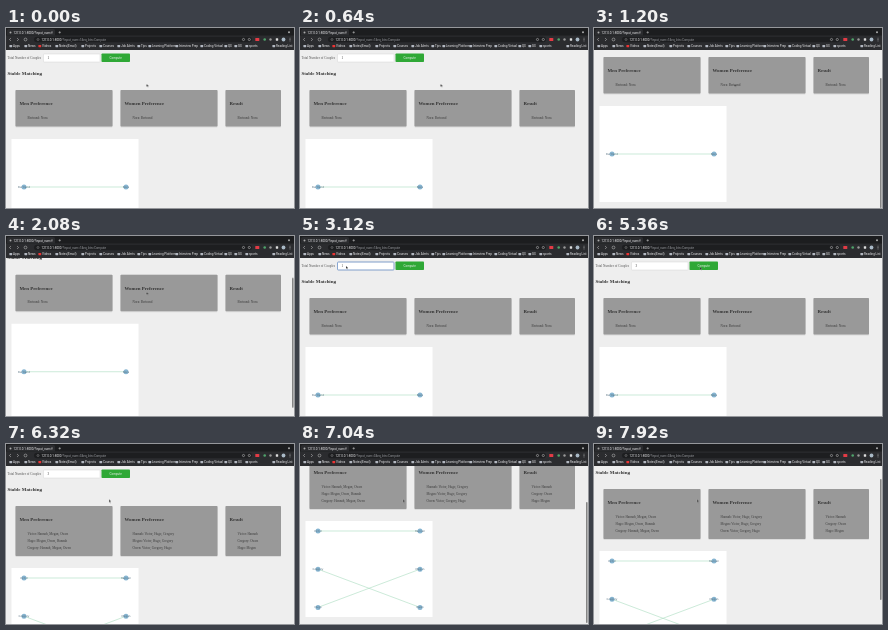
An HTML page for the animation above (8 s loop, 288 by 180 pixels).

```html
<!DOCTYPE html>
<html lang="en">
<head>
<meta charset="utf-8">
<title>Stable Matching</title>
<style>
html, body { margin: 0; width: 100%; height: 100%; overflow: hidden; background: #eee; }
svg { display: block; width: 100vw; height: 100vh; }
text { font-family: "Liberation Serif", serif; font-size: 3.3px; fill: #3c3c3c; }
.ui text, .small { font-family: Roboto, sans-serif; font-size: 3px; fill: #f0f0f2; }
.ui .dim { fill: #9a9ca0; }
.head { font-size: 4.9px; font-weight: bold; fill: #333; }
.mid { text-anchor: middle; }
.node { fill: #86b4d0; }
.edge { stroke: #a9dcc0; stroke-width: .6; }
.label { font-family: "DejaVu Sans", sans-serif; font-size: 2.7px; text-anchor: middle; fill: #56707f; }

.page, .thumb, .cursor, .before, .after, .focus, .menu, .one, .three, .bar {
  animation: 8s linear infinite;
}
.page { animation-name: scroll; animation-timing-function: ease-in-out; }
.thumb { animation-name: thumb; animation-timing-function: ease-in-out; }
.cursor { animation-name: pointer; animation-timing-function: ease-in-out; }
.before, .after, .focus, .menu, .one, .three, .bar { animation-timing-function: step-end; }
.before { animation-name: before; }
.after { animation-name: after; }
.focus { animation-name: focus; }
.menu { animation-name: menu; }
.one { animation-name: one; }
.three { animation-name: three; }
.bar { animation-name: bar; }

@keyframes scroll {
  0%, 12% { transform: translateY(0); }
  15%, 23% { transform: translateY(-33px); }
  31%, 79.5% { transform: translateY(0); }
  86%, 93% { transform: translateY(-47px); }
  98.5%, 100% { transform: translateY(-17px); }
}
@keyframes thumb {
  0%, 12% { transform: translateY(0); height: 130px; }
  15%, 23% { transform: translateY(28px); height: 130px; }
  31% { transform: translateY(0); height: 130px; }
  79.5% { transform: translateY(0); height: 121px; }
  86%, 93% { transform: translateY(36px); height: 121px; }
  98.5%, 100% { transform: translateY(13px); height: 121px; }
}
@keyframes pointer {
  0%, 31% { transform: translate(140.5px, 56px); }
  37%, 46% { transform: translate(46px, 30px); }
  53%, 59% { transform: translate(45px, 39px); }
  65%, 69% { transform: translate(106px, 31px); }
  76%, 100% { transform: translate(103px, 55.5px); }
}
@keyframes before { 0% { visibility: visible; } 68%, 100% { visibility: hidden; } }
@keyframes after { 0% { visibility: hidden; } 68%, 100% { visibility: visible; } }
@keyframes focus { 0% { visibility: hidden; } 38% { visibility: visible; } 67%, 100% { visibility: hidden; } }
@keyframes menu { 0% { visibility: hidden; } 47% { visibility: visible; } 59%, 100% { visibility: hidden; } }
@keyframes one { 0% { visibility: visible; } 59%, 100% { visibility: hidden; } }
@keyframes three { 0% { visibility: hidden; } 59%, 100% { visibility: visible; } }
@keyframes bar { 0% { visibility: hidden; } 12% { visibility: visible; } 33% { visibility: hidden; } 80%, 100% { visibility: visible; } }
</style>
</head>
<body>
<svg viewBox="0 0 288 180" preserveAspectRatio="none">
  <defs>
    <filter id="shadow" x="-10%" y="-10%" width="120%" height="130%">
      <feDropShadow dx="0" dy=".4" stdDeviation=".5" flood-opacity=".2"/>
    </filter>
  </defs>
  <rect width="288" height="180" fill="#eee"/>

  <g class="page">
    <text x="1.5" y="31" style="fill:#555">Total Number of Couples</text>
    <rect x="37.5" y="26" width="56.5" height="8" rx=".6" fill="#fff" stroke="#ccc" stroke-width=".4"/>
    <rect class="focus" x="37.5" y="26" width="56.5" height="8" rx=".8" fill="none" stroke="#7d9fd0" stroke-width=".9"/>
    <text class="one" x="41.5" y="31.2">1</text>
    <text class="three" x="41.5" y="31.2">3</text>
    <rect x="95.5" y="25.5" width="28.5" height="8.5" rx=".8" fill="#2fa836"/>
    <text class="small mid" x="109.7" y="30.9">Compute</text>
    <text class="head" x="1.5" y="46.5">Stable Matching</text>
    <g id="before" class="before"></g>
    <g id="after" class="after"></g>
    <g class="menu">
      <rect x="37.5" y="34" width="57" height="18.5" rx="1" fill="#1b1c1e"/>
      <text class="small" x="40" y="41">3</text>
      <text class="small" x="40" y="48">10</text>
    </g>
  </g>

  <g class="bar"><rect class="thumb" x="286" y="22" width="1.6" height="121" rx=".8" fill="#858585"/></g>

  <g id="chrome" class="ui">
    <rect width="288" height="22" fill="#2b2c2f"/>
    <rect width="288" height="7.5" fill="#1c1d1f"/>
    <path d="M1 7.5V2.5q0-1.5 1.5-1.5H47.5q1.5 0 1.5 1.5V7.5z" fill="#2b2c2f"/>
    <circle cx="4.5" cy="4.4" r="1" fill="#aaa"/>
    <text x="7.5" y="5.5">127.0.0.1:8000/?input_num=</text>
    <path d="M45.2 3.6l1.6 1.6m0-1.6l-1.6 1.6M52.5 4.4h2.4m-1.2-1.2v2.4M5 10l-1.6 1.5L5 13M11 10l1.6 1.5L11 13" fill="none" stroke="#ccc" stroke-width=".5"/>
    <circle cx="19.5" cy="11.5" r="1.4" fill="none" stroke="#ccc" stroke-width=".5"/>
    <circle cx="283" cy="4.2" r="1" fill="#aaa"/>
    <rect x="28" y="8.7" width="218" height="5.6" rx="2.8" fill="#1d1e20"/>
    <circle cx="32" cy="11.5" r="1" fill="none" stroke="#aaa" stroke-width=".4"/>
    <text class="before dim" x="35.5" y="12.6"><tspan fill="#f0f0f2">127.0.0.1:8000</tspan>/?input_num=1&amp;eq_btn=Compute</text>
    <text class="after dim" x="35.5" y="12.6"><tspan fill="#f0f0f2">127.0.0.1:8000</tspan>/?input_num=3&amp;eq_btn=Compute</text>
    <circle cx="237.5" cy="11.5" r="1.1" fill="none" stroke="#ccc" stroke-width=".5"/>
    <circle cx="243.3" cy="11.5" r="1.1" fill="none" stroke="#ccc" stroke-width=".5"/>
    <rect x="249.3" y="10" width="4" height="3" rx=".6" fill="#e23b45"/>
    <circle cx="258.7" cy="11.5" r="1.3" fill="#4fa36a"/>
    <circle cx="264.5" cy="11.5" r="1.2" fill="#999"/>
    <rect x="269.8" y="10.3" width="2.4" height="2.4" rx=".4" fill="#ddd"/>
    <circle cx="277.5" cy="11.5" r="1.9" fill="#a9b9c6"/>
    <path d="M284 9.8v3.6" stroke="#ddd" stroke-width=".7" stroke-dasharray=".7"/>
  </g>

  <path class="cursor" d="M0 0v2.8l.7-.6.5 1 .5-.2-.5-1.1h.9z" fill="#222" stroke="#ddd" stroke-width=".2"/>
</svg>
<script>
const NS = "http://www.w3.org/2000/svg";
const $ = id => document.getElementById(id);

function add(parent, tag, attrs, content = "") {
  const el = document.createElementNS(NS, tag);
  for (const key in attrs) el.setAttribute(key, attrs[key]);
  el.textContent = content;
  parent.append(el);
}

function drawCards(parent, height, lists) {
  const cards = [["Men Preference", 9.5, 97], ["Women Preference", 114.5, 97], ["Result", 219.5, 55.5]];
  cards.forEach(([title, x, width], i) => {
    add(parent, "rect", { x, y: 62, width, height, rx: .8, fill: "#999", filter: "url(#shadow)" });
    add(parent, "text", { x: x + 4, y: 77, class: "head" }, title);
    lists[i].forEach((line, row) =>
      add(parent, "text", { x: x + 12, y: 90.6 + row * 7 }, line));
  });
}

function drawGraph(parent, top, men, women, matches, firstY) {
  const rowY = row => firstY + row * 38.2;
  add(parent, "rect", { x: 5.5, y: top, width: 127, height: 96, fill: "#fff" });
  matches.forEach((to, from) => add(parent, "line",
    { x1: 18, y1: rowY(from), x2: 120, y2: rowY(to), class: "edge" }));
  [[men, 18], [women, 120]].forEach(([names, x]) => names.forEach((name, row) => {
    add(parent, "circle", { cx: x, cy: rowY(row), r: 2.5, class: "node" });
    add(parent, "text", { x, y: rowY(row) + 1, class: "label" }, name);
  }));
}

drawCards($("before"), 36.5, [["Bertrand: Nora"], ["Nora: Bertrand"], ["Bertrand: Nora"]]);
drawGraph($("before"), 111, ["Bertrand"], ["Nora"], [0], 159);

drawCards($("after"), 50, [
  ["Victor: Hannah, Megan, Owen", "Hugo: Megan, Owen, Hannah", "Gregory: Hannah, Megan, Owen"],
  ["Hannah: Victor, Hugo, Gregory", "Megan: Victor, Hugo, Gregory", "Owen: Victor, Gregory, Hugo"],
  ["Victor: Hannah", "Gregory: Owen", "Hugo: Megan"]
]);
drawGraph($("after"), 124, ["Victor", "Gregory", "Hugo"], ["Hannah", "Megan", "Owen"], [0, 2, 1], 134);

const bookmarks = [["Apps", 7], ["News", 22], ["Videos", 36], ["Notes(Email)", 53], ["Projects", 79],
  ["Courses", 97], ["Job Alerts", 115], ["Tips", 135], ["Learning Platforms", 146],
  ["Interview Prep", 173], ["Coding Virtual", 198], ["QS", 222], ["GS", 232], ["sports", 243], ["Reading List", 270]];
bookmarks.forEach(([name, x]) => {
  const fill = name === "Videos" ? "#e33" : "#b4b9c2";
  add($("chrome"), "rect", { x: x - 3.6, y: 17, width: 2.8, height: 2.2, rx: .4, fill });
  add($("chrome"), "text", { x, y: 19.2 }, name);
});
</script>
</body>
</html>
```
